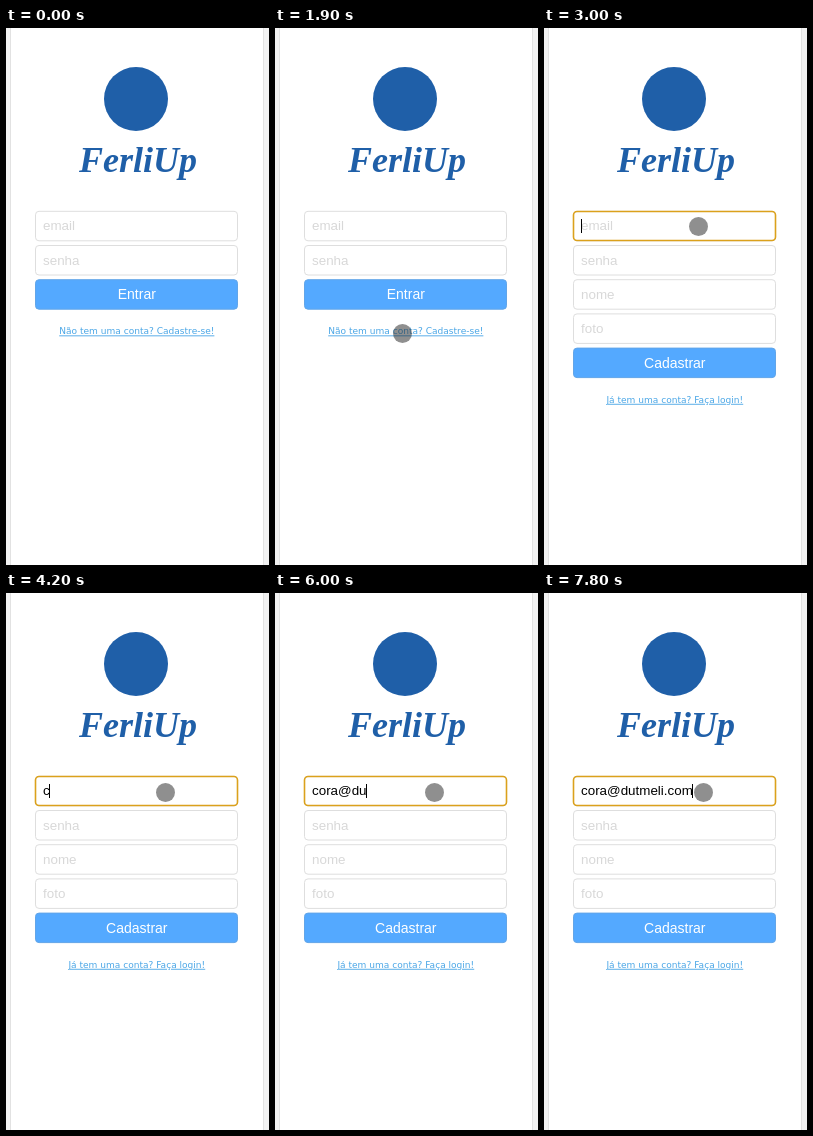
An HTML page that plays this animation: 263 by 537 pixels, repeating every 8000 ms.

```html
<!DOCTYPE html>
<html lang="pt">
<head>
<meta charset="utf-8">
<style>
html, body { margin: 0; width: 100%; height: 100%; overflow: hidden; background: #f2f2f2; }
svg { display: block; }
text { font: 13.4px "Liberation Sans", Arial, sans-serif; white-space: pre; }
.brand { font: italic bold 36px "Liberation Serif", serif; fill: #1f5fa8; }
.field { fill: #fff; stroke: #dedede; }
.hint { fill: #d8d8d8; }
.button { fill: #54a9ff; stroke: #62a5e8; }
.label { font-size: 14px; fill: #fff; }
.link { font: 9.05px "DejaVu Sans", sans-serif; fill: #4aa6e6; text-decoration: underline; }
.label, .link, .brand { text-anchor: middle; }
</style>
</head>
<body>
<svg width="263" height="537" viewBox="0 0 263 537">
  <rect x="4.5" y="-1" width="253" height="540" fill="#fff" stroke="#e2e2e2"/>
  <circle cx="130" cy="71" r="32" fill="#1f5fa8"/>
  <text class="brand" x="132" y="144">FerliUp</text>
  <g id="login"></g>
  <g id="signup"></g>
  <g id="focus">
    <rect x="29.5" y="183.5" width="202" height="29" rx="3.5" fill="none" stroke="#dba11c" stroke-width="1.6"/>
    <rect id="caret" y="191" width="1" height="14"/>
  </g>
  <text id="typed" x="37" y="202"></text>
  <circle id="pointer" r="9.5" fill="#202020" fill-opacity=".5"/>
</svg>
<script>
const $ = id => document.getElementById(id);
const LOOP = 8000, STEP = 100, ROW = 34.2;

const moves = [
  { from: 500, to: 900, dx: -85.5, dy: 188 },
  { from: 900, to: 1900, dx: -4.5, dy: -1 },
  { from: 2000, to: 2400, dx: 9, dy: -95 },
  { from: 2600, to: 2800, dx: 18, dy: -12 },
  { from: 3100, to: 3300, dx: 5, dy: 1 }
];
const bursts = [
  { text: 'cora', start: 4200, pace: 100 },
  { text: '@dutm', start: 5500, pace: 175 },
  { text: 'eli.com', start: 6900, pace: 150 }
];

const during = (t, from, to) => t >= from && t < to;
const show = (id, on) => { $(id).style.display = on ? '' : 'none'; };

function ease(t, from, to) {
  const u = Math.min(1, Math.max(0, (t - from) / (to - from)));
  return u * u * (3 - 2 * u);
}

function pointerAt(t) {
  let x = 217.5, y = 118.5;
  for (const { from, to, dx, dy } of moves) {
    const k = ease(t, from, to);
    x += dx * k;
    y += dy * k;
  }
  return `translate(${x} ${y})`;
}

const typedAt = t => bursts.map(({ text, start, pace }) =>
  text.slice(0, Math.max(0, Math.floor((t - start) / pace) + 1))).join('');

function buildForm(id, hints, label, link) {
  const row = (i, kind) =>
    `<rect class="${kind}" x="29.5" y="${183.3 + ROW * i}" width="202" height="29.5" rx="3.5"/>`;
  const end = ROW * hints.length;
  $(id).innerHTML = hints.map((hint, i) => row(i, 'field') +
    `<text class="hint" id="${id}-${hint}" x="37" y="${202.4 + ROW * i}">${hint}</text>`).join('') +
    row(hints.length, 'button') +
    `<text class="label" x="130.8" y="${202.8 + end}">${label}</text>` +
    `<text class="link" x="130.8" y="${238 + end}">${link}</text>`;
}

buildForm('login', ['email', 'senha'], 'Entrar', 'Não tem uma conta? Cadastre-se!');
buildForm('signup', ['email', 'senha', 'nome', 'foto'], 'Cadastrar', 'Já tem uma conta? Faça login!');

function draw(now) {
  const t = Math.floor(now % LOOP / STEP) * STEP;
  show('login', t < 2000);
  show('signup', t >= 2000);

  const typed = typedAt(t);
  $('typed').textContent = typed;
  show('signup-email', !typed);
  show('focus', t >= 3000);
  show('caret', !during(t, 6400, 6700));
  $('caret').setAttribute('x', Math.round(36.6 + (typed && $('typed').getComputedTextLength())));

  // The pointer hides for a while as typing goes on
  show('pointer', t >= 500 && !during(t, 4900, 5600));
  $('pointer').setAttribute('transform', pointerAt(t));
  requestAnimationFrame(draw);
}
requestAnimationFrame(draw);
</script>
</body>
</html>
```
